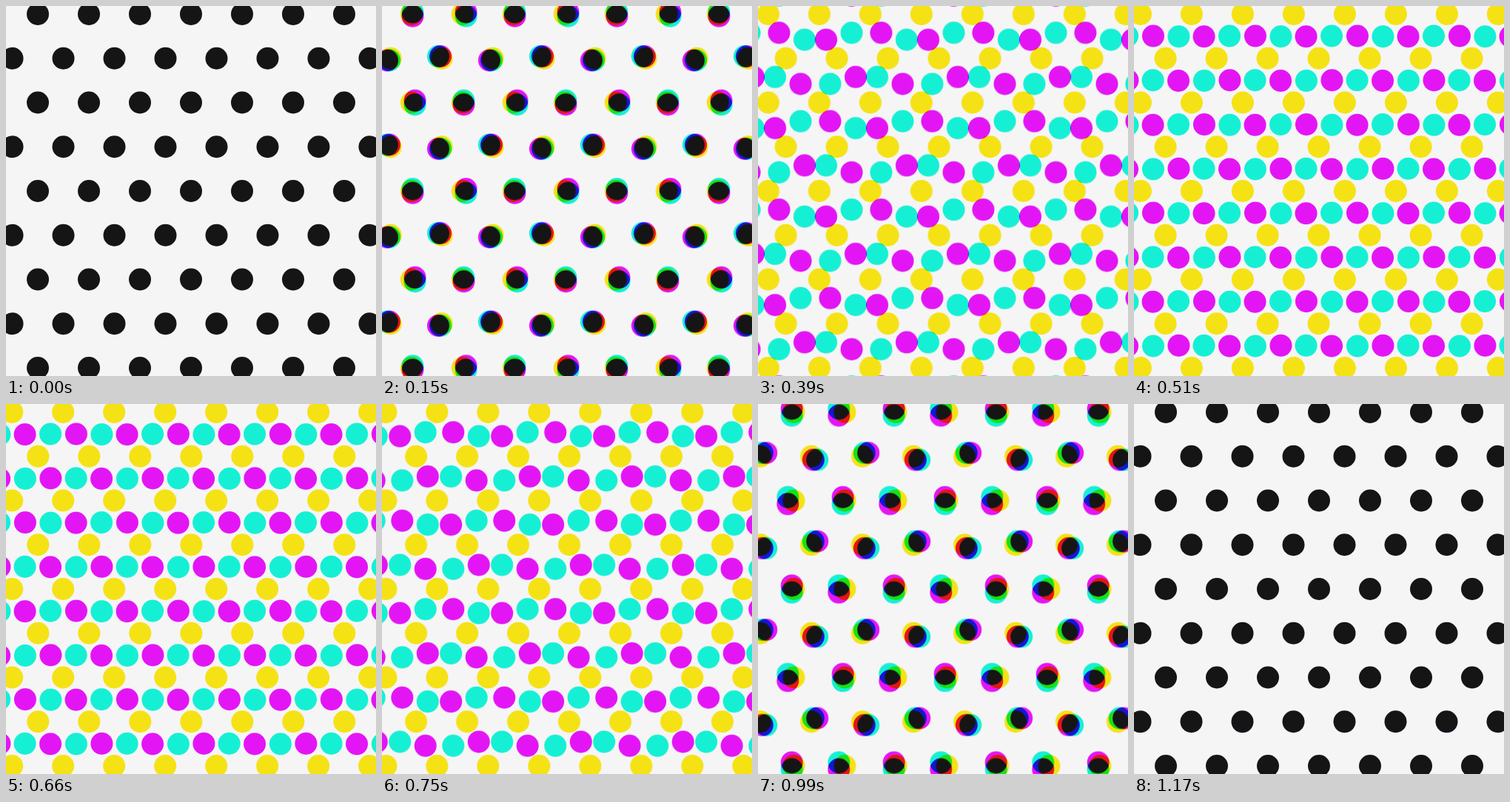
An HTML page with a canvas for the animation above (1200 ms loop, 500 by 500 pixels).

```html
<!DOCTYPE html>
<html>
<head>
<meta charset="utf-8">
<style>
html, body { margin: 0; width: 100%; height: 100%; overflow: hidden; background: #f5f5f5; }
canvas { display: block; }
</style>
</head>
<body>
<canvas id="stage" width="500" height="500"></canvas>
<script>
const SIZE = 500, GAP = 69, RADIUS = 15, LOOP = 1200, STEP = 30;
const SHUTTER = 24, SAMPLES = 6, H = Math.sqrt(3) / 2;

// Each ink slides along one lattice axis; neighbouring lines go opposite ways.
const inks = [
  { color: '#15f0d5', dx: 0.5, dy: H, line: (a, b) => a },
  { color: '#e415fa', dx: 0.5, dy: -H, line: (a, b) => a + b },
  { color: '#f7e215', dx: -1, dy: 0, line: (a, b) => b }
];

const ctx = document.getElementById('stage').getContext('2d');
const layer = document.createElement('canvas');
layer.width = layer.height = SIZE;
const pen = layer.getContext('2d');

function ease(p) {
  const half = q => 0.5 * Math.pow(2 * q, 2.8);
  return p < 0.5 ? half(p) : 1 - half(1 - p);
}

function drawDots(time) {
  const u = time / (LOOP / 2), whole = Math.floor(u);
  const shift = GAP / 2 * (whole + ease(u - whole));
  pen.globalCompositeOperation = 'source-over';
  pen.fillStyle = '#f5f5f5';
  pen.fillRect(0, 0, SIZE, SIZE);
  pen.globalCompositeOperation = 'darken';
  for (const { color, dx, dy, line } of inks) {
    pen.fillStyle = color;
    for (let b = -6; b <= 6; b++) {
      for (let a = -9; a <= 9; a++) {
        const d = line(a, b) % 2 ? -shift : shift;
        pen.beginPath();
        pen.arc(SIZE / 2 + GAP * (a + b / 2) + d * dx,
                SIZE / 2 + GAP * H * b + d * dy, RADIUS, 0, 2 * Math.PI);
        pen.fill();
      }
    }
  }
}

// Average several moments of the open shutter for motion blur.
function render(time) {
  for (let i = 0; i < SAMPLES; i++) {
    drawDots(time + SHUTTER * (i + 0.5) / SAMPLES);
    ctx.globalAlpha = 1 / (i + 1);
    ctx.drawImage(layer, 0, 0);
  }
}

let shown = -1;
function tick() {
  const time = Math.floor((performance.now() + 0.5) % LOOP / STEP) * STEP;
  if (time !== shown) render(shown = time);
  requestAnimationFrame(tick);
}
tick();
</script>
</body>
</html>
```
